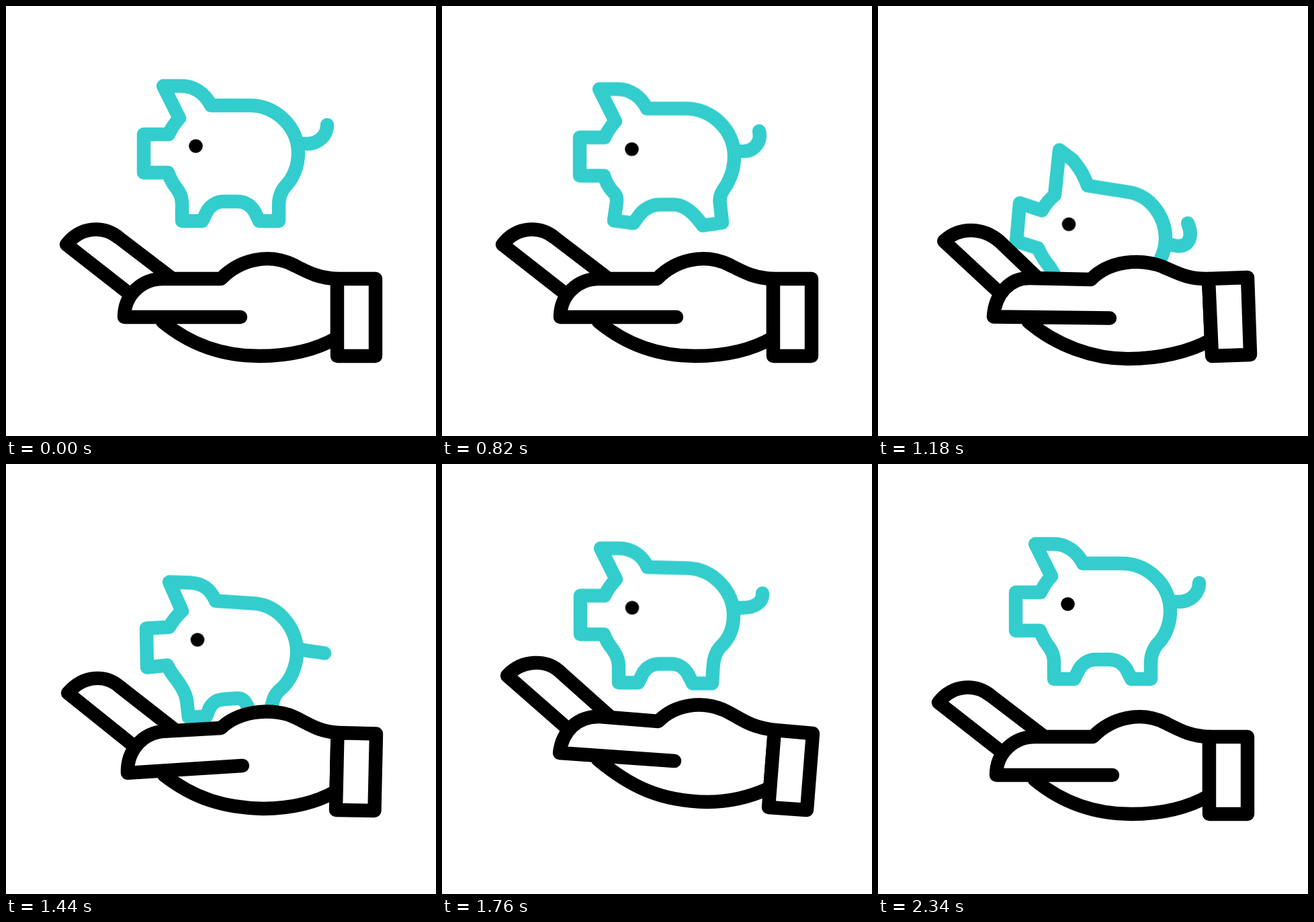
Recreate the animation shown at these times as an HTML page. Size 640 px wide and 640 px high, loop 2.4 s.

```html
<!DOCTYPE html>
<html lang="en">
<head>
<meta charset="utf-8">
<title>Piggy bank in hand</title>
<style>
  html, body { margin: 0; width: 100%; height: 100%; overflow: hidden; background: #fff; }
  svg {
    display: block; width: 100vw; height: 100vh;
    fill: #fff; stroke-width: 20.4; stroke-linecap: round; stroke-linejoin: round;
  }
  .teal { stroke: #33cdcd; }
  .hand { stroke: #000; }
  .open { fill: none; }
  .bare { stroke: none; }
  .coin, .pig, .body, .tail, .eye, .finger, .palm, .cuff {
    animation: 2400ms linear infinite;
  }

  /* Coin drops in behind the pig's filled body */
  .coin { animation-name: coin; }
  @keyframes coin {
    0%, 15% { transform: translateY(-50px); animation-timing-function: cubic-bezier(.333, 0, .667, .333); }
    30.62% { transform: translateY(219px); }
    30.63%, 100% { transform: translateY(-50px); }
  }

  .pig { animation-name: pig; }
  @keyframes pig {
    0% { transform: translateY(0); }
    30.625% { transform: translateY(0); animation-timing-function: cubic-bezier(.333, 0, .667, .333); }
    45.833% { transform: translateY(82.6px); }
    49.167% { transform: translateY(116px); animation-timing-function: ease-out; }
    52.083% { transform: translateY(130px); animation-timing-function: cubic-bezier(.4, 0, .7, .6); }
    60% { transform: translateY(53.5px); animation-timing-function: cubic-bezier(.2, .5, .4, .95); }
    73.333% { transform: translateY(5.5px); animation-timing-function: ease-out; }
    82.5%, 100% { transform: translateY(0); }
  }

  .eye { animation-name: eye; }
  @keyframes eye {
    0%, 37.5% { transform: translateX(0); }
    49.167% { transform: translateX(1.5px); }
    60% { transform: translateX(2.5px); }
    73.333% { transform: translateX(.5px); }
    82.5%, 100% { transform: translateX(0); }
  }

  .body { animation-name: body; }
  @keyframes body {
    0%, 30.625%, 82.5%, 100% {
      d: path("M205 191L242 191Q248 178 258 167L234 119L261 119C280 119 296 130 305 148L362 148C402 148 435 180 435 219C435 239 427 257 416 268C409 276 406 286 406 297L406 320L377 320L371 308C366 298 357 291 345 291L324 291C313 291 304 297 299 306L292 320L262 320L262 297C262 284 259 278 252 269Q246 261 241 248L205 248Z");
    }
    34.167% {
      d: path("M205 191L242 191Q248 178 258 167L234 119L261 119C280 119 296 130 305 148L362 148C402 148 435 180 435 219C435 239 429 251 424 261C415 274 412 280 414 291L417 318L388 322L381 313C372 302 360 291 345 291L324 291C313 291 302 297 295 305L285 318.5L256 315L260 287C261 277 257 275 251 268Q245 260 241 248L205 248Z");
    }
    37.5% {
      d: path("M205 191L242 191Q248 178 258 167L234 119L261 119C280 119 296 130 305 148L362 148C402 148 435 180 435 219C435 239 429 251 424 261C414 274 410 281 415 291L422 317L394 324L385 314C374 302 360 291 345 291L324 291C313 291 300 296 292 305L279 320L250 314L259 287C261 277 257 275 251 268Q245 260 241 248L205 248Z");
    }
    49.167%, 52.083% {
      d: path("M211 177L244 188Q251 175 263 165L270 98L290 113C302 128 306 135 312 151L375 161C407 167 428 199 428 229C428 249 420 262 412 276C402 282 398 292 399 302L400 322L372 322L366 312C361 302 353 293 342 293L324 293C313 293 306 299 303 308L300 322L272 322L270 300C268 292 262 282 254 270Q246 261 238 244L206 234Z");
    }
    60% {
      d: path("M209 191.5L243 189.5Q250 176.5 262 165.5L243 122.5L274 123.5C293 124.5 304 133 312 150.5L371 154.5C409 158.5 433 194.5 433 226.5C433 250 422 270 410 281C399 290 398 297 395 308L393 322L366 322L361 311C357 301 353 295 344 295.5L324 297C314 298 308 301 303 310L298 322.5L272 324L269 299C268 290 262 279 254 268Q245 257 240 246.5L210 249.5Z");
    }
    73.333% {
      d: path("M206 190.5L242 190.5Q248 178 259 166L236 120L263 120C282 120 298 130 306 148L366 149.5C404 151 434 184 434 220C434 240 426 256 414 267C406 276 404 286 403.5 297L402 321L373 321L367 309C362 299 353 292 342 292L324 292C313 292 304 297 299 306L292 320L263 320L263 297C263 284 259 278 253 269Q246 261 241 248L206 248Z");
    }
  }

  .tail { animation-name: tail; }
  @keyframes tail {
    0%, 30.625%, 82.5%, 100% { d: path("M438 205L448 205C465 205 478 193 478 177"); }
    34.167% { d: path("M438 211.5L448 211.5C465 212 476 197 472 181.5"); }
    49.167%, 52.083% { d: path("M430 238L446 241C464 241 469 226 461 207"); }
    60% { d: path("M437 222.5L448 224.5C457 226 465 227 474 228.5"); }
    73.333% { d: path("M438 208.5L448 208.5C466 208.5 478 200 477 187"); }
  }

  .finger { animation-name: finger; }
  @keyframes finger {
    0%, 45%, 97.5%, 100% { d: path("M182 427L90 355C112 327 146 327 168 345L244 403"); }
    49.167% { d: path("M180 426L98 350C120 329 155 328 181 350.5L236 403"); animation-timing-function: ease-out; }
    52.083% { d: path("M179 425L103 347C125 329 160 329 188 354L231 403"); animation-timing-function: ease-in; }
    60% { d: path("M188 418L92 341C116 313 149 314 169 331.5L249 394"); animation-timing-function: ease-out; }
    73.333% { d: path("M186 393L97 315C120 290 155 292 173 307L248 374"); animation-timing-function: ease-in; }
    85.833% { d: path("M184 413L92 339C115 313 148 314 169 331L248 392"); animation-timing-function: ease-out; }
  }

  /* Thumb, top, wrist and heel in one stroke; the wrist line lies under the cuff */
  .palm { animation-name: palm; }
  @keyframes palm {
    0%, 45%, 97.5%, 100% {
      d: path("M349 463L176 463C176 430 202 406 234 406L320 406C347 378 390 367 427 385C449 396 464 405 493 406L493 493.5C461 512 422 521 377 521C322 521 273 503 233 470");
    }
    49.167% {
      d: path("M345 464.5L172 462.5C174 428 197 405 225 405L317 407C344 379 390 375 424 388C447 398 462 407 492 406L496 496.5C463 515 418 525 372 525C320 525 265 505 224 470");
      animation-timing-function: ease-out;
    }
    52.083% {
      d: path("M342.5 465.5L169.5 462C172.5 427 194 404 219.5 404.5L315 407.5C342 380 390 379 422 390C446 399 461 408 491 406L498 498C463 518 415 531 369 530.5C318 530 260 506 218.5 470");
      animation-timing-function: ease-in;
    }
    60% {
      d: path("M352 449L181 460C180 425 205 400 235 398L320 393C346 368 388 364 420 373C445 382 460 398 493.5 400L491.6 487C460 505 425 513 383 513C325 512 280 498 235 463");
      animation-timing-function: ease-out;
    }
    73.333% {
      d: path("M346 442L175 430C179 397 202 375 235 376L322 383C346 358 386 352 419 366C445 378 455 391 495 396L488.3 482C460 495 430 503 395 503C325 502 280 480 232 440");
      animation-timing-function: ease-in;
    }
    85.833% {
      d: path("M348 455L176 450C178 417 203 393 234 394L320 396C347 368 390 362 424 379C447 390 462 401 494 402L491.4 487C460 505 425 513 385 513C325 513 277 496 232 461");
      animation-timing-function: ease-out;
    }
  }

  .cuff { animation-name: cuff; }
  @keyframes cuff {
    0%, 45%, 97.5%, 100% { d: path("M493 406L550 406L550 521L493 521Z"); }
    49.167% { d: path("M492 406L550 404L554 519L497 521Z"); animation-timing-function: ease-out; }
    52.083% { d: path("M491 406L551 402.5L557 518L499.5 521.5Z"); animation-timing-function: ease-in; }
    60% { d: path("M493.5 400L551 401.5L548.5 516L491 515Z"); animation-timing-function: ease-out; }
    73.333% { d: path("M495 396L552 401L543 515L486 511Z"); animation-timing-function: ease-in; }
    85.833% { d: path("M494 402L551 404L548 518.5L490.5 516.5Z"); animation-timing-function: ease-out; }
  }
</style>
</head>
<body>
<svg viewBox="0 0 640 640">
  <circle class="coin teal" cx="335" cy="0" r="38"/>
  <g class="pig">
    <path class="tail teal open"/>
    <path class="body teal"/>
    <circle class="eye bare" cx="282.5" cy="208.5" r="10.3" fill="#000"/>
  </g>
  <g class="hand">
    <path class="finger"/>
    <path class="palm"/>
    <path class="cuff"/>
  </g>
</svg>
</body>
</html>
```
